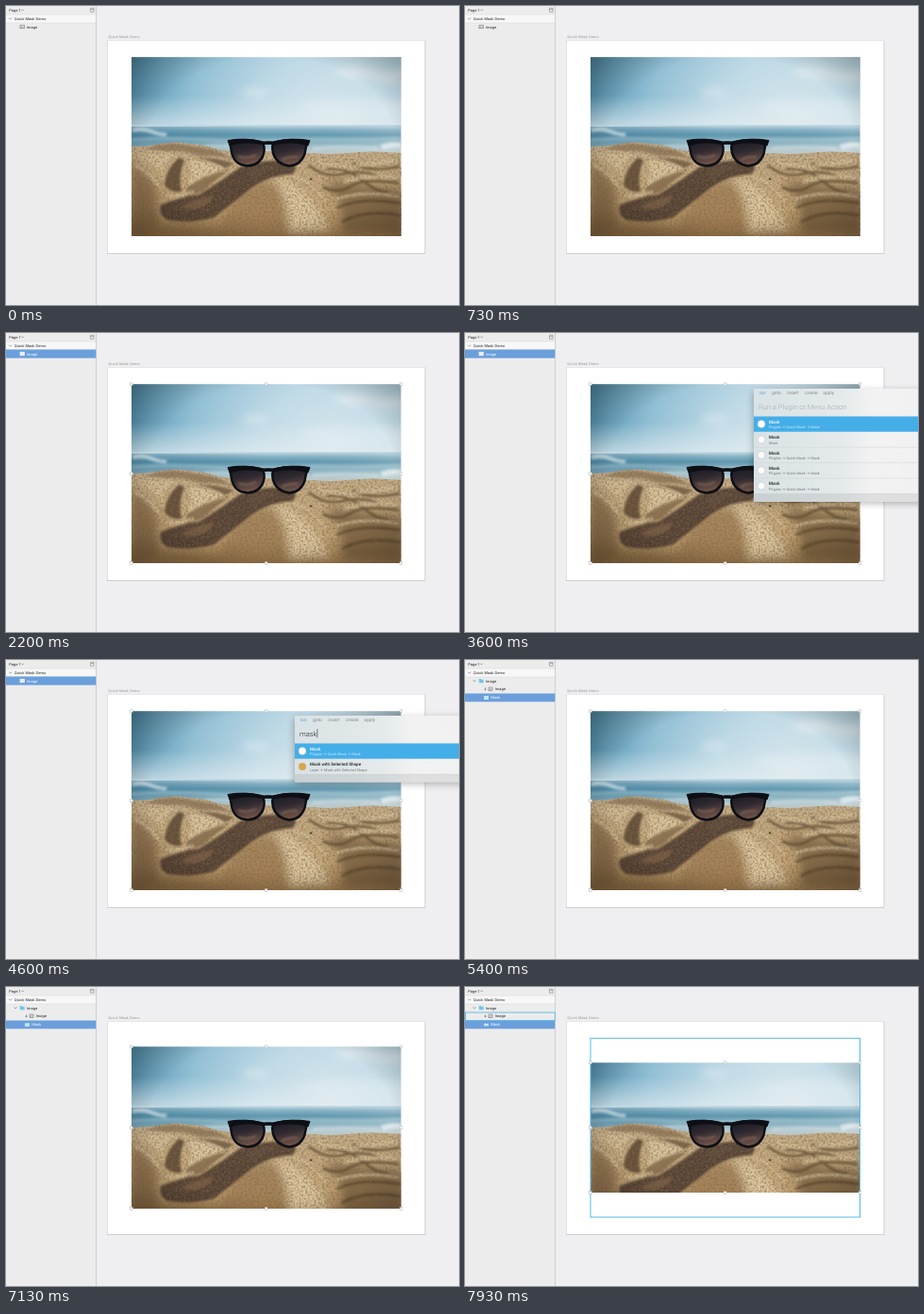
Animation of 480x317 px, one loop 8 s. Source, as an HTML page:

```html
<!DOCTYPE html>
<html lang="en">
<head>
<meta charset="utf-8">
<title>Masking an image</title>
<style>
  html, body { margin: 0; width: 100%; height: 100%; overflow: hidden; background: #efeef0; }
  svg { display: block; width: 100vw; height: 100vh; }
  text { font-family: Roboto, Inter, sans-serif; white-space: pre; text-rendering: geometricPrecision; }
  .ui { font-family: Inter, Roboto, sans-serif; font-size: 3.9px; fill: #222; }
  .sel { fill: #fff; }
</style>
</head>
<body>
<svg id="stage" viewBox="0 0 480 317">
  <defs>
    <radialGradient id="sky" gradientUnits="userSpaceOnUse" cx="345" cy="135" r="235">
      <stop offset="0" stop-color="#dde9ee"/><stop offset=".35" stop-color="#c0dae6"/>
      <stop offset=".65" stop-color="#93c0d5"/><stop offset=".85" stop-color="#649fba"/>
      <stop offset="1" stop-color="#39799a"/>
    </radialGradient>
    <linearGradient id="haze" x1="0" y1="0" x2="0" y2="1">
      <stop offset="0" stop-color="#e3edf1" stop-opacity="0"/>
      <stop offset="1" stop-color="#e3edf1" stop-opacity=".7"/>
    </linearGradient>
    <linearGradient id="sea" x1="0" y1="0" x2="0" y2="1">
      <stop offset="0" stop-color="#c8dce4"/><stop offset=".16" stop-color="#86b1c4"/>
      <stop offset=".32" stop-color="#6299b0"/><stop offset=".55" stop-color="#87b1c0"/>
      <stop offset=".8" stop-color="#b8cbd0"/><stop offset="1" stop-color="#c4c9c4"/>
    </linearGradient>
    <linearGradient id="seaSide" x1="0" y1="0" x2="1" y2="0">
      <stop offset="0" stop-color="#1f5f80" stop-opacity=".35"/>
      <stop offset=".5" stop-color="#1f5f80" stop-opacity="0"/>
      <stop offset="1" stop-color="#fff" stop-opacity=".15"/>
    </linearGradient>
    <linearGradient id="sand" x1="0" y1="0" x2="0" y2="1">
      <stop offset="0" stop-color="#c3ae8c"/><stop offset=".35" stop-color="#c6ab80"/>
      <stop offset=".7" stop-color="#c0a172"/><stop offset="1" stop-color="#a27e4d"/>
    </linearGradient>
    <linearGradient id="lens" x1="0" y1="0" x2=".3" y2="1">
      <stop offset="0" stop-color="#161720"/><stop offset=".5" stop-color="#2f2930"/>
      <stop offset="1" stop-color="#6f5348"/>
    </linearGradient>
    <radialGradient id="vignette" cx=".52" cy=".45" r=".75">
      <stop offset=".6" stop-color="#21180f" stop-opacity="0"/>
      <stop offset="1" stop-color="#21180f" stop-opacity=".4"/>
    </radialGradient>
    <linearGradient id="glass" x1="0" y1="0" x2="1" y2="0">
      <stop offset="0" stop-color="#d9e2e5"/><stop offset=".55" stop-color="#e5eaeb"/>
      <stop offset=".72" stop-color="#f2f2f2"/><stop offset="1" stop-color="#f1f1f1"/>
    </linearGradient>
    <filter id="b1" x="-20%" y="-50%" width="140%" height="200%"><feGaussianBlur stdDeviation=".8"/></filter>
    <filter id="b2" x="-20%" y="-50%" width="140%" height="200%"><feGaussianBlur stdDeviation="1.5"/></filter>
    <filter id="b4" x="-30%" y="-60%" width="160%" height="220%"><feGaussianBlur stdDeviation="4"/></filter>
    <filter id="grain" x="0" y="0" width="100%" height="100%">
      <feTurbulence type="fractalNoise" baseFrequency=".45" numOctaves="2" seed="4"/>
      <feColorMatrix values="0 0 0 0 .2  0 0 0 0 .14  0 0 0 0 .08  1.6 0 0 0 -.65"/>
      <feComposite in2="SourceGraphic" operator="in"/>
    </filter>
    <clipPath id="mask"><rect id="maskRect" x="133" width="285.5"/></clipPath>
    <path id="dunes" d="M133 149Q152 149 165 146Q180 143 194 146Q212 147 224 152Q240 155 254 154H281Q309 157 326 156Q341 158 360 156Q390 153 419 156V245H133Z"/>
  </defs>

  <rect width="480" height="317" fill="#efeef0"/>
  <text class="ui" x="108.3" y="34" style="fill:#9a9a9a">Quick Mask Demo</text>
  <rect x="107" y="36.5" width="337.4" height="226.4" rx=".5" fill="#bbb" opacity=".75"/>
  <rect x="107.6" y="36.7" width="336" height="225.4" fill="#fff"/>

  <g clip-path="url(#mask)">
    <rect x="133" y="54" width="286" height="76" fill="url(#sky)"/>
    <rect x="133" y="95" width="286" height="34" fill="url(#haze)"/>
    <g fill="#e9f1f4" filter="url(#b4)">
      <path d="M345 70Q366 59 384 66T422 66V79Q400 83 384 76Q366 79 345 70Z" opacity=".6"/>
      <ellipse cx="264" cy="92" rx="14" ry="5" opacity=".45"/>
      <ellipse cx="375" cy="108" rx="65" ry="10" opacity=".3"/>
    </g>
    <rect x="133" y="126" width="286" height="33" fill="url(#sea)"/>
    <rect x="133" y="128" width="286" height="30" fill="url(#seaSide)"/>
    <g stroke="#e6eff1" fill="none" filter="url(#b2)">
      <path d="M134 132q10-3 20 1t16 3" stroke-width="3.5" opacity=".75"/>
      <path d="M133 142q40-3 85 0t110-1q50 2 92-1" stroke-width="2.5" opacity=".35"/>
      <path d="M398 150q10-4 22-2" stroke-width="6" opacity=".85"/>
      <path d="M210 149q30-2 45 1M325 151q30-3 70 0" stroke-width="3" opacity=".45"/>
    </g>

    <use href="#dunes" fill="url(#sand)"/>
    <g filter="url(#b4)">
      <path d="M133 165Q150 175 160 195Q158 210 163 235L133 240Z" fill="#6d5030" opacity=".55"/>
      <path d="M285 182Q318 184 345 238L300 240Q302 210 285 182Z" fill="#e2cca4" opacity=".85"/>
      <path d="M338 185Q380 188 420 196V240H357Q360 210 338 185Z" fill="#5d4429" opacity=".55"/>
      <path d="M250 195Q275 180 288 192Q302 220 296 240L225 240Q230 215 250 195Z" fill="#94714a" opacity=".6"/>
      <path d="M133 234Q180 228 225 237T330 240V250H133Z" fill="#7d5b36" opacity=".45"/>
    </g>
    <g filter="url(#b1)">
      <path d="M146 152Q170 143 187 147Q205 149 222 153Q232 157 240 162Q220 158 205 159Q190 153 170 154Q158 152 146 152Z" fill="#7a6145" opacity=".6"/>
      <path d="M138 158Q160 154 182 158Q170 163 163 176Q154 165 138 158Z" fill="#d7c19a" opacity=".6"/>
      <path d="M183 161Q169 173 168 190Q174 198 186 197Q182 180 189 163Z" fill="#4e3a26" opacity=".8"/>
      <path d="M190 164Q201 172 192 191Q210 179 231 172Q213 163 190 164Z" fill="#dfcba5" opacity=".75"/>
      <path d="M203 161Q222 160 242 167L232 172Q219 164 203 161Z" fill="#5d4731" opacity=".7"/>
      <path d="M192 192Q208 180 236 174Q222 184 208 197L190 203Z" fill="#6d5439" opacity=".6"/>
      <path d="M164 211Q182 203 205 200Q226 187 248 171Q272 162 302 164Q310 170 304 178Q280 179 261 192Q240 209 221 224Q196 231 172 227Q161 222 164 211Z" fill="#4b382c" opacity=".9"/>
      <path d="M186 212Q204 204 220 201Q218 210 201 215Q189 217 186 212Z" fill="#86684a" opacity=".6"/>
      <path d="M255 175Q274 167 294 170Q276 174 262 184Z" fill="#67503f" opacity=".5"/>
      <g fill="none" stroke="#4f3b26" stroke-width="2.6" opacity=".72">
        <path d="M321 169Q338 183 358 178T397 182"/>
        <path d="M336 192Q351 200 365 191T416 188"/>
        <path d="M351 214Q376 202 418 209"/>
        <path d="M367 167Q385 177 417 170"/>
        <path d="M340 173Q360 170 378 185T405 197"/>
        <path d="M356 229Q380 215 418 222"/>
      </g>
      <g fill="none" stroke="#dfcba6" stroke-width="2.6" opacity=".7">
        <path d="M330 164Q350 173 369 170T414 163"/>
        <path d="M358 187Q378 178 415 182"/>
        <path d="M136 169Q151 174 162 191"/>
        <path d="M349 205Q378 195 416 202"/>
        <path d="M305 181Q325 186 338 207"/>
        <path d="M169 202Q186 201 199 197"/>
      </g>
    </g>
    <use href="#dunes" filter="url(#grain)"/>
    <circle cx="323" cy="183.500" r="1" fill="#2d241c"/>

    <g stroke="#0d0f15" stroke-linejoin="round">
      <path d="M237 144Q252 140 271 144.500Q275 148 273 157Q269 169 256 169.500Q243 169 239.500 157Z" fill="url(#lens)" stroke-width="2.4"/>
      <path d="M284 144.500Q303 140 319 144L316.500 157Q312 169 300 169.500Q287 168 283 156Q281 148 284 144.500Z" fill="url(#lens)" stroke-width="2.400"/>
      <path d="M235 142.500Q254 139 273 144Q278 143.500 283 144Q302 139 322 142.500L320 148Q303 142.500 285 146.500Q278 146 271 146.500Q253 142.500 237 148Z" fill="#0d0f15" stroke-width="1"/>
    </g>
    <path d="M246 159Q255 163 265 158M292 163Q300 159 309 160" fill="none" stroke="#a5806a" stroke-width="2" opacity=".5" filter="url(#b1)"/>
    <rect x="133" y="54" width="286" height="191" fill="url(#vignette)"/>
  </g>

  <rect id="outline" x="133" y="54.300" width="285.500" height="189.700" fill="none" stroke="#55b9e8"/>
  <g id="handles" fill="#fff" stroke="#adadad" stroke-width=".5"></g>

  <rect width="95.5" height="317" fill="#ececec"/>
  <rect y="9" width="95.500" height="9" fill="#f7f7f7"/>
  <path d="M0 9H95.500M0 18H95.500" stroke="#dadada" stroke-width=".6"/>
  <path d="M95.600 0V317" stroke="#c5c5c5" stroke-width=".8"/>
  <text class="ui" x="3.200" y="5.800">Page 1</text>
  <path d="M16.300 3.700l1.300 1.300 1.300-1.300M3.200 12.700l1.400 1.500 1.400-1.500" fill="none" stroke="#666" stroke-width=".6"/>
  <path d="M89.500 2.300h3.600v4h-3.600zM89.500 3.600h3.600" fill="none" stroke="#888" stroke-width=".6"/>
  <text class="ui" x="8.800" y="15">Quick Mask Demo</text>

  <g id="single">
    <rect id="rowBlue" y="17.500" width="95.300" height="9.100" fill="#6b9fdc"/>
    <g id="rowIcon" stroke-width=".6"><rect x="15" y="20.200" width="4.400" height="3.600" fill="#e5e5e5"/><path d="M15.200 23.400l1.400-1.500 1.100.8 1-.7" fill="none"/></g>
    <text class="ui" id="rowText" x="22" y="23.700">Image</text>
    <g id="eye"><ellipse cx="87.300" cy="22.200" rx="2.500" ry="1.500" fill="#4fa6e6"/><circle cx="87.300" cy="22.200" r=".7" fill="#fff"/></g>
  </g>

  <g id="group">
    <path d="M8.600 21.400l1.400 1.500 1.400-1.500" fill="none" stroke="#666" stroke-width=".6"/>
    <path d="M14.800 20h1.900l.6.700h2.300v3.500h-4.800z" fill="#74c5e8"/>
    <text class="ui" x="22" y="23.700">Image</text>
    <path d="M21.500 29.300v2.500m-.9-.9l.9 1 .9-1" fill="none" stroke="#555" stroke-width=".6"/>
    <rect x="25" y="29" width="4" height="3.600" fill="#e5e5e5" stroke="#777" stroke-width=".6"/>
    <path d="M25.300 32l1.300-1.500 1 .8.900-.7" fill="none" stroke="#777" stroke-width=".6"/>
    <text class="ui" x="31.800" y="32.400">Image</text>
    <rect y="35.500" width="95.300" height="8.800" fill="#6b9fdc"/>
    <rect id="maskIcon" x="20" width="5" fill="#c3e4ee"/>
    <text class="ui sel" x="27.300" y="41.400">Mask</text>
    <rect id="rowHover" x=".5" y="27" width="94.800" height="8.400" fill="none" stroke="#58b9e6" stroke-width=".9"/>
  </g>

  <g id="panel">
    <rect id="shadow" x="306" y="62" width="190" fill="#000" opacity=".32" filter="url(#b4)"/>
    <rect id="panelBg" x="306" y="59" width="174" fill="url(#glass)"/>
    <g id="tabs"></g>
    <path d="M306 88.300H480" stroke="#cdd4d7" stroke-width=".5"/>
    <text id="query" x="311" y="80.500" font-size="7.550" font-weight="300"></text>
    <path id="caret" stroke="#333" stroke-width=".6"/>
    <rect x="306" y="88.500" width="174" height="16.200" fill="#44aee8"/>
    <g id="recent"></g>
    <g id="found"></g>
    <path id="footer" fill="#000" opacity=".08"/>
  </g>
</svg>
<script>
const LOOP = 8000;
const T = { hover: 1270, select: 1670, open: 3070, typing: 3740, key: 140, run: 4870, drag: 6740, drop: 7720, rowHover: 7860 };
const $ = id => document.getElementById(id);
const set = (el, attrs) => { for (const k in attrs) el.setAttribute(k, attrs[k]); };
const show = (id, on) => { $(id).style.display = on ? '' : 'none'; };

function add(parent, tag, attrs, text) {
  const el = document.createElementNS('http://www.w3.org/2000/svg', tag);
  set(el, attrs);
  if (text) el.textContent = text;
  return parent.appendChild(el);
}

[['run', 311.7], ['goto', 325], ['insert', 341.3], ['create', 360], ['apply', 379.3]].forEach(([name, x], i) =>
  add($('tabs'), 'text', { x, y: 65.4, 'font-size': 4.9, fill: i ? '#84898c' : '#43a5de' }, name));

function addResult(list, i, title, sub, color = '#fdfdfd') {
  const y = 88.5 + i * 16.4, g = add(list, 'g', {});
  add(g, 'circle', { cx: 314, cy: y + 8, r: 4, fill: color, stroke: '#aaa', 'stroke-width': color === '#fdfdfd' ? .4 : 0 });
  add(g, 'text', { x: 322, y: y + 7.3, 'font-size': 4.6, 'font-weight': 500, fill: i ? '#222' : '#fff' }, title);
  add(g, 'text', { x: 322, y: y + 12.6, 'font-size': 3.9, fill: i ? '#777' : '#cfeafa' }, sub);
  if (i) add(g, 'path', { d: `M306 ${y + 16.3}H480`, stroke: '#cdd2d3', 'stroke-width': .5 });
}

const plugin = 'Plugins → Quick Mask → Mask';
for (let i = 0; i < 5; i++) addResult($('recent'), i, 'Mask', i === 1 ? 'Mask' : plugin);
addResult($('found'), 0, 'Mask', plugin);
addResult($('found'), 1, 'Mask with Selected Shape', 'Layer → Mask with Selected Shape', '#d9a650');

const knobs = [];
for (const x of [133, 275.7, 418.5])
  for (const row of [0, .5, 1])
    if (x !== 275.7 || row !== .5) knobs.push({ row, el: add($('handles'), 'rect', { x: x - 1.3, width: 2.6, height: 2.6 }) });

function drawPanel(t) {
  const typed = 'mask'.slice(0, Math.max(0, Math.floor((t - T.typing) / T.key) + 1));
  const height = typed ? 70.7 : 120;
  show('recent', !typed);
  show('found', typed);
  set($('shadow'), { height: height - 2 });
  set($('panelBg'), { height });
  set($('footer'), { d: `M306 ${50.5 + height}H480V${59 + height}H306Z` });
  $('query').textContent = typed || 'Run a Plugin or Menu Action';
  set($('query'), { fill: typed ? '#222' : '#a3abaf' });
  set($('caret'), { d: `M${311.6 + $('query').getComputedTextLength()} 73V82.5` });
  show('caret', typed);
}

function draw(t) {
  const selected = t >= T.select, grouped = t >= T.run;
  const hover = t >= T.hover && !selected, rowHover = t >= T.rowHover;
  const open = t >= T.open && !grouped;

  const p = Math.min(1, Math.max(0, (t - T.drag) / (T.drop - T.drag)));
  const inset = 26 * p * p * (3 - 2 * p);
  const top = 54.2 + inset, height = 189.8 - 2 * inset;
  set($('maskRect'), { y: top, height });
  for (const k of knobs) set(k.el, { y: top + k.row * height - 1.3 });
  const iconH = 4 - inset / 18;
  set($('maskIcon'), { y: 40 - iconH / 2, height: iconH });

  show('handles', selected);
  show('outline', hover || rowHover);
  show('eye', hover);
  show('single', !grouped);
  show('group', grouped);
  show('rowBlue', selected);
  show('rowHover', rowHover);
  set($('rowIcon'), { stroke: selected ? '#fff' : '#777' });
  $('rowText').classList.toggle('sel', selected);
  show('panel', open);
  if (open) drawPanel(t);
}

const start = performance.now();
function tick() {
  draw((performance.now() - start) % LOOP);
  requestAnimationFrame(tick);
}
tick();
</script>
</body>
</html>
```
